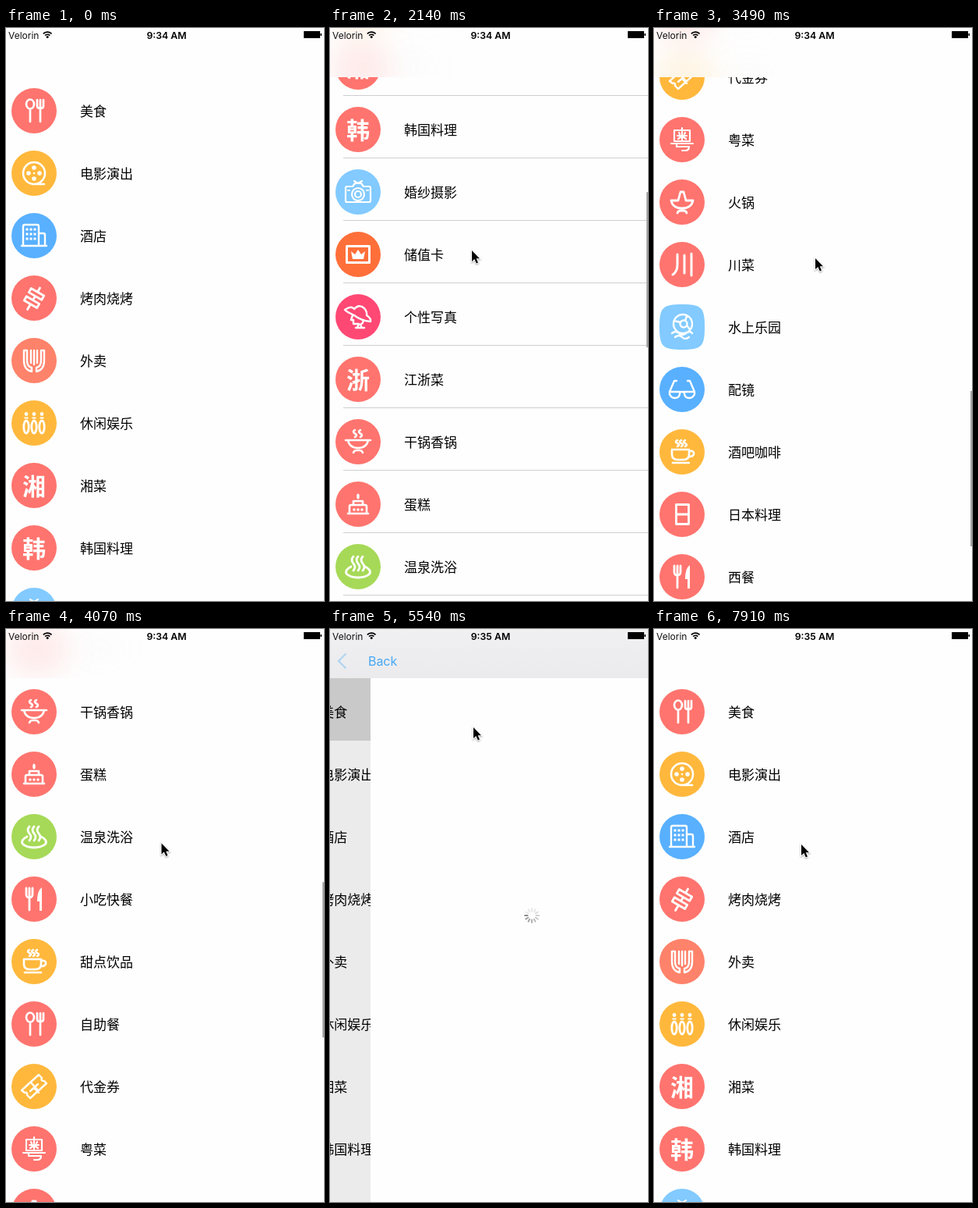
An HTML page with a canvas that plays this animation: 408 by 734 pixels, repeating every 8 s.

```html
<!DOCTYPE html>
<html lang="zh-CN">
<head>
<meta charset="utf-8">
<style>
html, body { margin: 0; width: 100%; height: 100%; overflow: hidden; background: #fefefe; }
canvas { display: block; }
</style>
</head>
<body>
<canvas id="stage" width="408" height="734"></canvas>
<script>
const W = 408, H = 734, BAR = 63, ROW = 80, LOOP = 8000, STEP = 148;
const ctx = document.getElementById('stage').getContext('2d');
const CJK = '"Noto Sans CJK SC", "Noto Sans CJK", sans-serif';
const MIXED = '"Liberation Sans", ' + CJK;
const UI = 'Inter, ' + CJK;
const PINK = '#fb5a96', GREY = '#8e8e8e';

const RED = '#ff746e', AMBER = '#ffb83c', BLUE = '#58b0ff', CORAL = '#ff826a',
  SKY = '#82caff', ORANGE = '#ff6f3a', ROSE = '#ff4874', GREEN = '#a6d957';

const oval = (x, y, rx, ry = rx) =>
  `M${x - rx} ${y}a${rx} ${ry} 0 1 0 ${2 * rx} 0a${rx} ${ry} 0 1 0 ${-2 * rx} 0`;
const box = (x, y, w, h) => `M${x} ${y}h${w}v${h}h${-w}z`;
const steam = (x, y, h) => `M${x} ${y}q-4 ${h / 4} 0 ${h / 2}t0 ${h / 2}`;
const each = (list, fn) => list.map(fn).join('');

// Category icons: line = stroked path, solid = filled path, glyph = character.
const spoon = {
  line: oval(-5, -8.5, 5, 6) + 'M-5-2V14M4-14V-6Q4-3 8-3T12-6V-14M8-14V14', width: 2.7
};
const reel = {
  line: oval(0, 0, 14) + 'M1 14H13', width: 2.6,
  solid: each([[0, -7], [-7, 0], [7, 0], [0, 7]], p => oval(...p, 2.8)) + oval(0, 0, 1.3)
};
const tower = {
  line: 'M-14 13V-12Q-14-14-12-14H4Q6-14 6-12V13M6-3H12Q14-3 14-1V13M-16 13H16', width: 2.4,
  solid: each([-9, -4, 1], x => each([-8, -2, 4], y => box(x - 1.5, y - 1.5, 3, 3)))
};
const kebab = {
  line: 'M-3.7-12.5L12.7-3 9.7 2.2-6.7-7.4ZM-9.7-2.2L6.7 7.4 3.7 12.5-12.7 3Z' +
    'M7.5-13L4.5-7.8M1.5-2.6L-1.5 2.6M-4.5 7.8L-8.5 14.5', width: 2.8
};
const meal = {
  line: each([-1, 1], s => `M${13 * s}-13H${9 * s}V0Q${9 * s} 8 ${3 * s} 9V14Q${13 * s} 12 ${13 * s} 0Z`) +
    'M-4-13V3M0-13V5M4-13V3', width: 2.4
};
const pins = {
  line: each([-10, 0, 10], x => oval(x, 5, 3.2, 8)), width: 2.8,
  solid: each([-10, 0, 10], x => oval(x, -11.5, 2.4) + box(x - 2.5, -7.5, 5, 2))
};
const camera = {
  line: 'M-14-7H-7L-4-11H4L7-7H14Q16-7 16-5V11Q16 13 14 13H-14Q-16 13-16 11V-5Q-16-7-14-7Z' +
    oval(0, 3, 8) + oval(0, 3, 4) + 'M-5-14L0-11 5-14M-13-2H-11M11-2H13', width: 2.2
};
const card = {
  line: box(-14.5, -10.5, 29, 21), width: 3,
  solid: 'M-7 6L-9-4-4 0 0-6 4 0 9-4 7 6Z'
};
const hat = {
  line: 'M-17-9Q-8-15-5-10Q1-17 8-11Q12-6 11-2Q17 2 16 6Q4 5-5-2Q-14-6-17-9ZM-7-2L-9 4H-6V9H1L-1 14M7 5Q6 9 3 10L5 14M-3 14H8',
  width: 2.4
};
const legs = 'M-6 14Q-5 11-2 11H2Q5 11 6 14';
const wok = {
  line: 'M-16-2H16M-13-2Q-11 8 0 8T13-2' + legs + each([-4, 3], x => steam(x, -15, 9)), width: 2.6
};
const cake = {
  line: 'M-13 12H13M-11 12V3Q-11 1-9 1H9Q11 1 11 3V12M-6 1V-4H6V1', width: 2.6,
  solid: oval(0, -10, 1.8, 3.5) + each([-5, 0, 5], x => oval(x, 7, 1.8))
};
const spring = {
  line: 'M-9 0Q-17 4-15 9Q-10 14 0 14T15 9Q17 4 9 0' + each([-6, 0, 6], x => steam(x, -13, 18)), width: 2.8
};
const ticket = {
  line: 'M-16 5L6-15 10-11Q8-7 13-7L16-4-5 15-9 11Q-8 7-12 8ZM-4-5L5 5M-5 6L5-3M0 2L6 8', width: 2.4
};
const claypot = {
  line: 'M-10-12H10V2H-10ZM0-15V-12M-14 5H14M-7 5V9H9Q9 14 4 14H0M0-10V0M-6-5H6M-4-9L-3-7M4-9L3-7M-1-4L-5-1M1-4L5-1',
  width: 2.2
};
const pot = { line: 'M-14-2H-5L-2-13H2L5-2H14Q12 8 0 8T-14-2' + legs, width: 2.8 };
const river = { line: 'M-6-13V0Q-6 9-12 13M3-12V11M12-14V14', width: 3 };
const water = {
  line: oval(1, -4, 12) + oval(2, -4, 4.5) + 'M-10-8L-2-6M6-14L4-8M6-2L10 3M-13 8q5-4 9 0t9 0 8 0M-9 13q5-4 9 0t9 0',
  width: 2.4, square: true
};
const glasses = {
  line: each([-1, 1], s => `M${16 * s} 3H${3 * s}V6Q${4 * s} 11 ${9 * s} 11T${16 * s} 6ZL${10 * s}-11H${7 * s}`) +
    'M-3 4Q0 2 3 4', width: 2.4
};
const cup = {
  line: 'M-13-3H9V3Q9 10 2 10H-6Q-13 10-13 3ZM9-1Q16-2 15 3Q14 6 9 6M-12 14H9' +
    each([-6, -1, 4], x => steam(x, -15, 8)), width: 2.6
};
const tray = { line: box(-7.5, -12.5, 16, 25) + 'M-7 0H8', width: 2.8 };
const cutlery = {
  line: 'M-10-14V-6Q-10-2-6-2T-2-6V-14M-6-14V14', width: 2.8,
  solid: 'M10-15Q4-11 4 3H7V15H10Z'
};
const glyph = ch => ({ glyph: ch });

const rows = [
  ['美食', RED, spoon], ['电影演出', AMBER, reel], ['酒店', BLUE, tower],
  ['烤肉烧烤', RED, kebab], ['外卖', CORAL, meal], ['休闲娱乐', AMBER, pins],
  ['湘菜', RED, glyph('湘')], ['韩国料理', RED, glyph('韩')], ['婚纱摄影', SKY, camera],
  ['储值卡', ORANGE, card], ['个性写真', ROSE, hat], ['江浙菜', RED, glyph('浙')],
  ['干锅香锅', RED, wok], ['蛋糕', RED, cake], ['温泉洗浴', GREEN, spring],
  ['小吃快餐', RED, cutlery], ['甜点饮品', AMBER, cup], ['自助餐', RED, spoon],
  ['代金券', AMBER, ticket], ['粤菜', RED, claypot], ['火锅', RED, pot],
  ['川菜', RED, river], ['水上乐园', SKY, water], ['配镜', BLUE, glasses],
  ['酒吧咖啡', AMBER, cup], ['日本料理', RED, tray], ['西餐', RED, cutlery],
  ['东北菜', RED, glyph('东')], ['海鲜', RED, wok], ['其他', SKY, camera]
];

// name, tag, offer, price, old price, stats, distance, photo tones (table, rim, food), disc colour
const shops = [
  ['谷穗邻里', '卡', '[5店通用]500元储值卡！免费WiFi！', '445', '500', '4.8分 售2376', '10km', ['#54402e', '#e3d3b8', '#d18a2c'], '#fff'],
  ['苏禾岚五味炖锅', '卡', '[13店通用]300元储值卡！免费WiFi！', '270', '300', '4.9分 售3895', '2.1km', ['#c08a4a', '#d9d2c4', '#4f3a2a'], '#fff'],
  ['岚川西岭饭庄', '券', '[44店通用]100元代金券！免费WiFi！', '95', '100', '4.7分 售500195', '663m', ['#ece4d8', '#d8a37c', '#c94a26'], '#fff'],
  ['席间友', '券', '[18店通用]100元代金券！免费WiFi！', '90.9', '100', '4.8分 售145033', '299m', ['#0b5539', '#0b5539', '#0b5539'], '#0d4830'],
  ['汐野初三', '券', '[19店通用]100元代金券！免费WiFi！', '90', '100', '4.8分 售115607', '525m', ['#cfc9c0', '#e6e3de', '#b5aaa0'], '#141212'],
  ['闻椒巷鱼火锅', '券', '[38店通用]100元代金券！免费WiFi！', '90', '100', '4.7分 售98214', '523m', ['#8a5a34', '#d9b98c', '#b5522a'], '#fff']
];

// Key poses by step: [step, value, ...]
const scrollKeys = [[0, 0], [1, 12], [3, 130], [6, 330], [9, 480], [11, 536], [13, 700], [16, 1120],
  [18, 1360], [20, 1483], [21, 1500], [22, 1440], [24, 960], [26, 240], [27, -26], [28, -8], [29, 0]];
const pointerKeys = [[1, 190, 420], [5, 181, 300], [11, 182, 285], [20, 207, 295], [28, 192, 254],
  [31, 184, 126], [43, 184, 126], [46, 56, 44], [47, 56, 44], [50, 189, 276]];
const pushKeys = [[32, 0], [33, 0.45], [34, 0.8725], [35, 0.985], [36, 1], [46, 1], [47, 0.6], [48, 0.12], [49, 0]];

function at(keys, step) {
  if (step <= keys[0][0]) return keys[0].slice(1);
  const i = keys.findIndex(key => key[0] >= step);
  if (i < 0) return keys[keys.length - 1].slice(1);
  const a = keys[i - 1], b = keys[i], u = (step - a[0]) / (b[0] - a[0]);
  return a.slice(1).map((v, n) => v + (b[n + 1] - v) * u);
}

function text(str, x, cy, size, color, { font = MIXED, weight = 400, align = 'left' } = {}) {
  ctx.font = `${weight} ${size}px ${font}`;
  ctx.textAlign = align;
  ctx.fillStyle = color;
  ctx.fillText(str, x, cy + size * 0.39);
  return ctx.measureText(str).width;
}

function rect(x, y, w, h, color) {
  ctx.fillStyle = color;
  ctx.fillRect(x, y, w, h);
}

function fill(path, color) {
  ctx.fillStyle = color;
  ctx.fill(new Path2D(path));
}

function stroke(path, width, color) {
  ctx.lineWidth = width;
  ctx.strokeStyle = color;
  ctx.stroke(new Path2D(path));
}

function frameBox(x, y, w, h, color) {
  ctx.lineWidth = 1;
  ctx.strokeStyle = color;
  ctx.strokeRect(x + 0.5, y + 0.5, w - 1, h - 1);
}

function clipped(x, y, w, h, draw) {
  ctx.save();
  ctx.beginPath();
  ctx.rect(x, y, w, h);
  ctx.clip();
  draw();
  ctx.restore();
}

const SQUIRCLE = 'M-29 0C-29-25-25-29 0-29S29-25 29 0 25 29 0 29-29 25-29 0Z';

function drawIcon(icon, color, x, y) {
  ctx.save();
  ctx.translate(x, y);
  fill(icon.square ? SQUIRCLE : oval(0, 0, 29), color);
  ctx.lineCap = ctx.lineJoin = 'round';
  if (icon.glyph) text(icon.glyph, 0, 0, 30, '#fff', { font: CJK, weight: 700, align: 'center' });
  if (icon.line) stroke(icon.line, icon.width, '#fff');
  if (icon.solid) fill(icon.solid, '#fff');
  ctx.restore();
}

function drawList(scroll, step, push) {
  // Hairlines only survive on every third scroll offset.
  const hairline = ((Math.round(scroll) % 3) + 3) % 3 === 2;
  const selected = step < 32 ? 0 : step < 47 ? 1 : Math.max(0, (49 - step) / 3);
  rect(0, 0, W, H, '#fefefe');
  clipped(0, BAR, W, H - BAR, () => {
    ctx.save();
    ctx.translate(-0.3 * W * push, 0);
    if (selected) rect(0, BAR, W, ROW, `rgba(217,217,217,${selected})`);
    rows.forEach(([label, color, icon], i) => {
      const y = 106 + i * ROW - scroll;
      if (y < 20 || y > H + 40) return;
      drawIcon(icon, color, 36, y);
      text(label, 95, y, 17, '#000', { font: CJK });
      if (hairline) rect(17, Math.round(y) + 36, W - 17, 1, '#cfcfd1');
    });
    ctx.restore();
    if (push) rect(0, BAR, W, H, `rgba(0,0,0,${0.085 * push})`);
  });
  clipped(0, 0, W, BAR, () => {
    ctx.filter = 'blur(18px)';
    ctx.globalAlpha = 0.14;
    rows.forEach(([label, color], i) => {
      const y = 106 + i * ROW - scroll;
      if (y < -40 || y > 95) return;
      fill(oval(40, y, 40, 34), color);
      rect(95, y - 5, label.length * 17, 10, '#bbb');
    });
  });
  if (step > 0 && step < 31) {
    const top = 66 + Math.max(0, scroll) * 0.269;
    rect(406, top, 2, 199 + Math.min(0, scroll), '#a5a5a5');
  }
}

function drawPhoto([table, rim, food], mark, y) {
  clipped(5, y, 100, 75, () => {
    rect(5, y, 100, 75, table);
    fill(oval(55, y + 46, 62, 42), rim);
    fill(oval(55, y + 46, 54, 35), food);
    fill(oval(55, y + 38, 36), mark);
    fill(`M5 ${y}h36l-36 36z`, '#ff9a2c');
    ctx.translate(18, y + 13);
    ctx.rotate(-Math.PI / 4);
    text('免预约', 0, 0, 10, '#fff', { align: 'center' });
  });
}

function drawShop([name, tag, offer, price, old, stats, far, tones, mark], i, loaded) {
  const y = 179 + i * 99;
  if (loaded) drawPhoto(tones, mark, y + 12);
  const tagX = 118 + text(name, 113, y + 21.5, 14, '#2c2c38', { weight: 500 });
  frameBox(tagX, y + 15, 14, 13, PINK);
  text(tag, tagX + 7, y + 21.5, 10, PINK, { align: 'center' });
  text(far, 403, y + 21, 10, GREY, { align: 'right' });
  text(offer, 113, y + 44, 12, '#5a5a5a');
  text('¥', 113, y + 65, 15, PINK);
  const oldX = 129 + text(price, 124, y + 65, 16, PINK);
  const oldW = text(old, oldX, y + 65.5, 11, GREY);
  rect(oldX, y + 65, oldW, 1, GREY);
  text(stats, 113, y + 83, 10, GREY);
  rect(0, y + 98, W, 1, '#dedede');
}

function drawDeals(step) {
  text('精选抢购', 5, 80, 19, '#f6b84c', { font: CJK });
  text('距开始', 5, 102, 12, '#555');
  ['00', '25', step < 43 ? '05' : '04'].forEach((n, i) => {
    const x = 45 + i * 31;
    rect(x, 94, 20, 16, '#919191');
    text(n, x + 10, 102, 12, '#fff', { align: 'center' });
    if (i < 2) text(':', x + 25.5, 101, 12, '#555', { align: 'center' });
  });
  [['10:00场', 307, PINK], ['17:00场', 359, '#666']].forEach(([label, x, color]) => {
    frameBox(x, 94, 44, 16, color);
    text(label, x + 22, 102, 12, color, { align: 'center' });
  });
  [118, 159, 178].forEach(y => rect(0, y, W, 1, '#dedede'));
  text('VIP会员', 8, 139, 16, PINK, { weight: 'italic 700' });
  text('抢购不限时&下单享立减', 77, 141, 13, '#4a4a4a');
  stroke('M388 132L396 139.5 388 147', 1.3, '#999');
  text('每人每天每单累计优惠2份', 5, 169, 12, '#555');
  shops.forEach((shop, i) => drawShop(shop, i, step >= 39));
}

function drawSpinner(step) {
  ctx.save();
  ctx.translate(207, 367);
  ctx.lineCap = 'round';
  for (let i = 0; i < 12; i++) {
    const age = (i + (34 - step) * 2 + 48) % 12;
    ctx.save();
    ctx.rotate((180 - i * 30) * Math.PI / 180);
    stroke('M5.5 0H9', 1.9, `rgba(90,90,90,${0.7 - Math.min(age, 8) * 0.07})`);
    ctx.restore();
  }
  ctx.restore();
}

function drawDetail(step, push) {
  const x = Math.round((1 - push) * W);
  clipped(x, BAR, W - x, H - BAR, () => {
    ctx.translate(x, 0);
    rect(0, BAR, W, H, '#fefefe');
    if (step < 38) drawSpinner(step);
    else drawDeals(step);
  });
  const pressed = step >= 46;
  ctx.save();
  ctx.globalAlpha = push;
  const shade = ctx.createLinearGradient(0, 0, 0, BAR);
  shade.addColorStop(0, '#eeeef0');
  shade.addColorStop(1, '#e8e8eb');
  rect(0, 0, W, BAR, shade);
  ctx.globalAlpha = push < 1 ? push * push * 0.4 : 1;
  stroke('M20.5 31.5L11 41 20.5 50.5', 2.3, pressed ? '#86b9e8' : '#2f9cf4');
  ctx.globalAlpha = push;
  text('Back', 28 + 164 * (1 - push), 41, 16, pressed ? '#c4dbf2' : '#2f9cf4', { font: UI });
  if (step >= 38) text('美食', 204 + x * 0.5, 41, 17, '#000', { font: CJK, weight: 500, align: 'center' });
  ctx.restore();
}

function drawStatus(step) {
  text('Velorin', 3, 9.5, 12, '#111', { font: UI });
  ctx.lineCap = 'butt';
  ctx.strokeStyle = '#000';
  ctx.lineWidth = 1.7;
  [4.2, 7.4].forEach(r => {
    ctx.beginPath();
    ctx.arc(53.2, 12.5, r, -Math.PI * 0.76, -Math.PI * 0.24);
    ctx.stroke();
  });
  fill(oval(53.2, 11.6, 1.5), '#000');
  text(step < 32 ? '9:34 AM' : '9:35 AM', 206, 9.5, 12.3, '#000', { font: UI, weight: 600, align: 'center' });
  rect(382, 4, 21, 9, '#000');
  rect(403.5, 7, 1.5, 3, '#000');
}

function drawPointer(x, y) {
  const arrow = 'M0 0V14L3.3 11 5.8 16.5 8 15.5 5.7 10.2H10Z';
  ctx.save();
  ctx.translate(x, y);
  ctx.shadowColor = 'rgba(0,0,0,.35)';
  ctx.shadowBlur = 2;
  ctx.shadowOffsetY = 1;
  ctx.lineJoin = 'miter';
  stroke(arrow, 2, '#fff');
  ctx.shadowColor = 'transparent';
  fill(arrow, '#000');
  ctx.restore();
}

function draw(time) {
  const step = time < 500 ? 0 : Math.floor((time - 500) / STEP);
  const [scroll] = at(scrollKeys, step);
  const [push] = at(pushKeys, step);
  drawList(scroll, step, push);
  if (push > 0) drawDetail(step, push);
  drawStatus(step);
  if (step > 0) drawPointer(...at(pointerKeys, step));
}

const start = performance.now();
function tick() {
  draw((performance.now() - start) % LOOP);
  requestAnimationFrame(tick);
}
tick();
</script>
</body>
</html>
```
